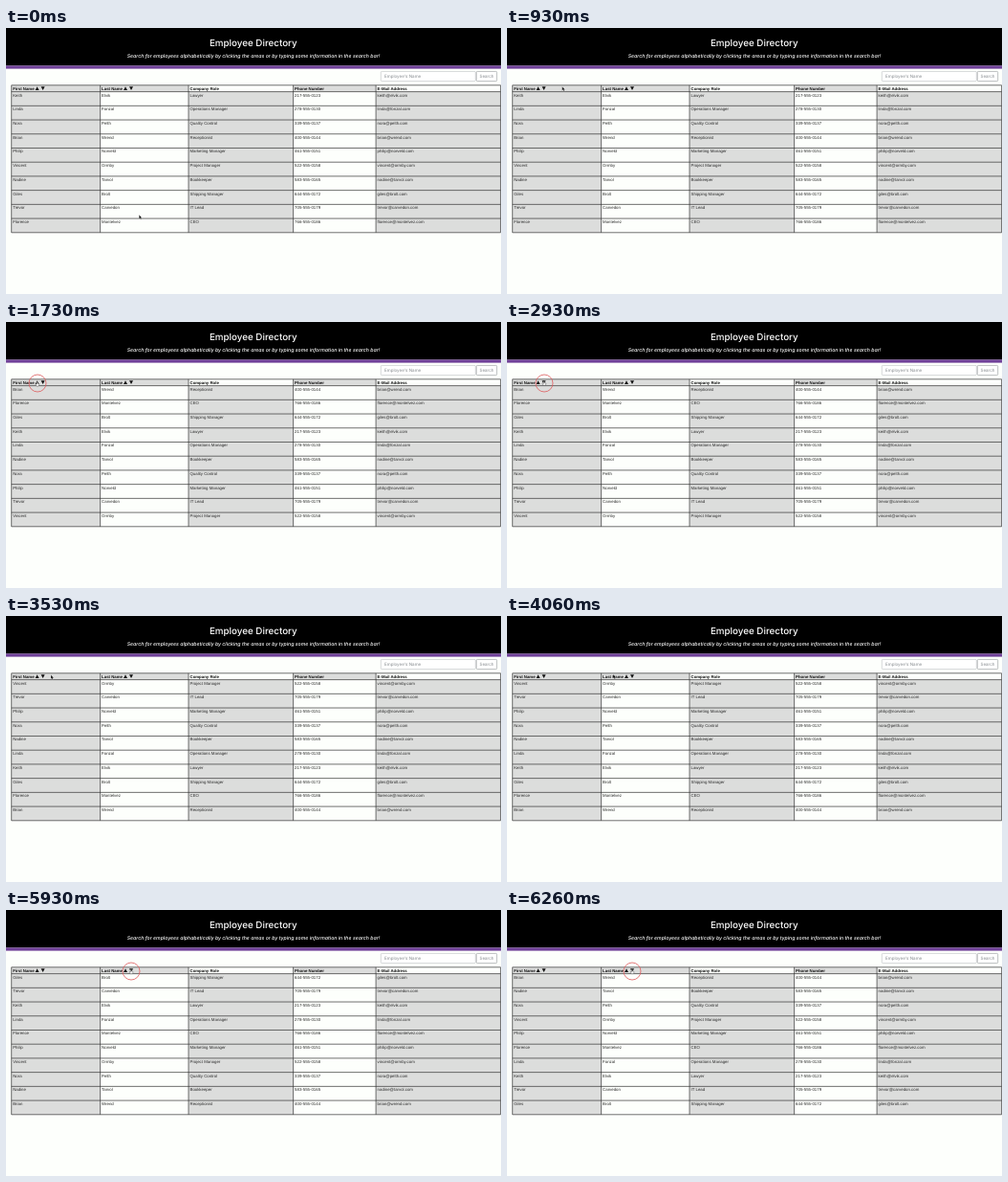
Recreate the animation shown at these times as an HTML page. Size 518 by 278 pixels, loop 7200 ms.

```html
<!DOCTYPE html>
<html lang="en">
<head>
<meta charset="utf-8">
<title>Employee Directory</title>
<style>
  html, body { margin: 0; width: 100%; height: 100%; overflow: hidden; background: #fdfffc; }
  svg { display: block; width: 100vw; height: 100vh; }
  text { font: 4.33px "Liberation Sans", Arial, sans-serif; fill: #2a2a2a; text-rendering: geometricPrecision; }
  .head { font-weight: bold; fill: #111; }
  .ui { font: 4.5px Inter, sans-serif; fill: #858a8e; }
  .title { font: 500 9.8px Inter, sans-serif; fill: #fff; }
  .hint { font: italic 500 5.2px Inter, sans-serif; fill: #fff; }
  .mid { text-anchor: middle; }
  .box { fill: #fff; stroke: #b9bdc0; stroke-width: .6; }
  .grey { fill: #dcdddc; }
  .grid { fill: none; stroke: #333; stroke-width: .7; }
</style>
</head>
<body>
<svg viewBox="0 0 518 278">
  <rect width="518" height="39.4"/>
  <rect y="39.4" width="518" height="3.2" fill="#6f3f98"/>
  <text class="title mid" x="258.8" y="18.8">Employee Directory</text>
  <text class="hint mid" x="259" y="31.2">Search for employees alphabetically by clicking the areas or by typing some information in the search bar!</text>
  <rect class="box" x="392.3" y="45.4" width="99" height="10.2" rx="1"/>
  <text class="ui" x="396" y="52.2">Employee's Name</text>
  <rect class="box" x="492.3" y="45.4" width="21.4" height="10.2" rx="1" style="stroke:#8d9296"/>
  <text class="ui mid" x="503" y="52.2">Search</text>
  <g id="table"></g>
  <g id="rows"></g>
  <circle id="ring" r="9" fill="none" stroke="#dd5a5c" stroke-width=".8"/>
  <g id="cursor">
    <path id="arrow" d="M0 0V4.2L1 3.3L1.7 4.9L2.4 4.6L1.7 3.1H3Z" stroke="#fff" stroke-width=".25"/>
    <path id="hand" d="M-.5 .3Q0 -.3 .5 .3V1.6L2 2V3.2L1.5 4.4H-.7L-1.8 2.6L-1.3 2.2L-.5 2.7Z" fill="#fff" stroke="#222" stroke-width=".35"/>
  </g>
</svg>
<script>
const $ = id => document.getElementById(id);
const LOOP = 7200, FPS = 15;
const COLS = [5.7, 98.6, 191, 300.6, 387.1, 517.6];
const TOP = 59.8, BODY = 66.6, ROW = 14.72, BOTTOM = BODY + 10 * ROW;
const HEADS = ["First Name", "Last Name", "Company Role", "Phone Number", "E-Mail Address"];

const people = `Keith Elvik Lawyer
Linda Fonzal Operations Manager
Nora Pelth Quality Control
Brian Wrend Receptionist
Philip Norveld Marketing Manager
Vincent Ormby Project Manager
Nadine Tarvol Bookkeeper
Giles Brolt Shipping Manager
Trevor Carvedon IT Lead
Florence Montelvez CEO`.split("\n").map((line, i) => {
  const [first, last, ...role] = line.split(" ");
  const phone = `${217 + i * 61}-555-01${23 + i * 7}`;
  return [first, last, role.join(" "), phone, `${first}@${last}.com`.toLowerCase()];
});

const sorted = col => [...people].sort((a, b) => a[col] < b[col] ? -1 : 1);
const orders = [people, sorted(0), sorted(0).reverse(), sorted(1), sorted(1).reverse()];

// Times below are in ticks of 1/15 s.
const clicks = [
  { x: 33, from: 26, sort: 26, to: 28 },
  { x: 39, from: 43, sort: 45, to: 46 },
  { x: 125, from: 65, sort: 67, to: 70 },
  { x: 131, from: 89, sort: 91, to: 94 }
];
const path = [
  [4, 139.3, 195.3], [9, 105, 130], [12, 72, 70], [14, 57.7, 61.3], [15, 50.5, 61],
  [18, 45, 66.5], [22, 32.6, 62.6], [36, 32.6, 62.6], [40, 38.7, 61.9], [52, 38.7, 61.9],
  [57, 80, 60.5], [61, 121.3, 61.3], [63, 125, 62.3], [81, 125, 62.3], [84, 128.5, 63.8], [86, 130.8, 62.3]
];

const cell = (c, y, h) =>
  `<rect class="grey" x="${COLS[c]}" y="${y}" width="${COLS[c + 1] - COLS[c]}" height="${h}"/>`;
const label = (c, y, s, cls = "") => `<text class="${cls}" x="${COLS[c] + 1.5}" y="${y}">${s}</text>`;
const triangles = x => `<path d="M${x - 2} 64.9h4l-2-3.7zM${x + 4} 61.3h4l-2 3.7z" fill="#111"/>`;

function drawTable() {
  const lines = [TOP, ...Array.from({ length: 11 }, (_, i) => BODY + i * ROW)];
  const grid = lines.map(y => `M${COLS[0]} ${y}H${COLS[5]}`).join("") +
    COLS.map(x => `M${x} ${TOP}V${BOTTOM}`).join("");
  $("table").innerHTML =
    [0, 1, 3].map(c => cell(c, TOP, BODY - TOP)).join("") +
    [0, 2, 4].map(c => cell(c, BODY, BOTTOM - BODY)).join("") +
    `<path class="grid" d="${grid}"/>` +
    HEADS.map((s, c) => label(c, 64.7, s, "head")).join("") +
    triangles(32.6) + triangles(125);
}

let shown = -1;
function showOrder(n) {
  if (n === shown) return;
  shown = n;
  $("rows").innerHTML = orders[n].map((person, r) =>
    person.map((s, c) => label(c, 71.6 + r * ROW, s)).join("")).join("");
}

function cursorAt(k) {
  const i = path.findIndex(p => p[0] >= k);
  if (i < 1) return path[i < 0 ? path.length - 1 : 0].slice(1);
  const [a, b] = [path[i - 1], path[i]];
  const f = (k - a[0]) / (b[0] - a[0]);
  return [1, 2].map(j => a[j] + (b[j] - a[j]) * f);
}

function frame(now) {
  const k = Math.floor((now % LOOP + 5) * FPS / 1000);
  showOrder(clicks.filter(c => k >= c.sort).length);

  const click = clicks.find(c => k >= c.from && k < c.to);
  $("ring").setAttribute("visibility", click ? "visible" : "hidden");
  if (click) $("ring").setAttribute("transform", `translate(${click.x} 64)`);

  const overButton = k >= 21 && k < 53 || k >= 62;
  $("cursor").setAttribute("transform", `translate(${cursorAt(k)})`);
  $("hand").setAttribute("visibility", overButton ? "visible" : "hidden");
  $("arrow").setAttribute("visibility", overButton ? "hidden" : "visible");
  requestAnimationFrame(tick);
}

let start;
function tick(now) {
  start ??= now;
  frame(now - start);
}

drawTable();
frame(0);
</script>
</body>
</html>
```
